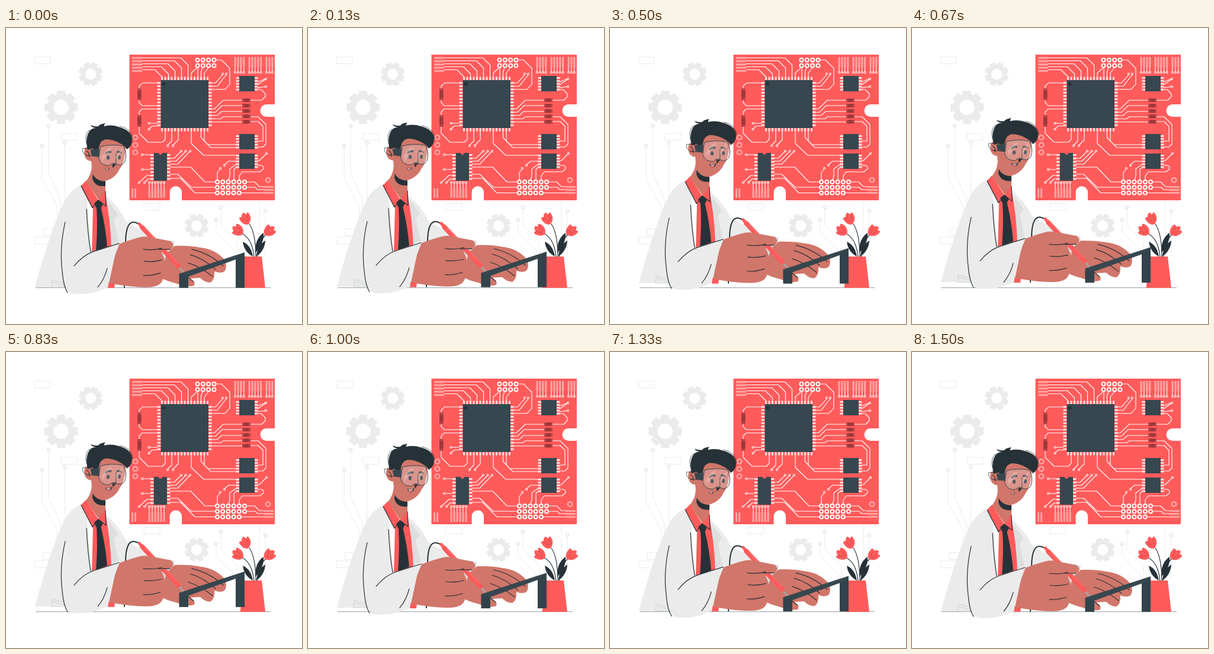
Recreate the animation shown at these times as an HTML page. Size 500 by 500 pixels, loop 1540 ms.

```html
<!DOCTYPE html>
<html lang="en">
<head>
<meta charset="utf-8">
<title>Engineer at work</title>
<style>
html, body { margin: 0; width: 100%; height: 100%; overflow: hidden; background: #fff; }
svg { display: block; width: 100vw; height: 100vh; }
.faint { fill: none; stroke: #ebebeb; }
.ink { fill: none; stroke: #263238; stroke-width: 1.2; stroke-linecap: round; stroke-linejoin: round; }
.thin { stroke-width: .7; }
.trace { fill: none; stroke: #fff; stroke-width: 1.1; stroke-linejoin: round; }
.pin { fill: #ffdede; }
.bar { fill: #ffa3a3; }
.chip { fill: #37474f; }
.dark { fill: #263238; }
.red { fill: #ff5b5b; }
.skin { fill: #d1766a; }
.coat { fill: #ebebeb; }
.shade { fill: #dedede; }
</style>
</head>
<body>
<svg viewBox="0 0 500 500">
  <g id="backdrop"></g>
  <path class="red" d="M208.500 45H454V129H440a10.500 10.500 0 0 0 0 21H454V291H297V277.500a10.200 10.200 0 0 0-20.400 0V291H208.500Z"/>
  <g id="board"></g>
  <path d="M50 438.700H447" stroke="#455a64" stroke-width=".6"/>

  <g id="plant">
    <path class="ink" d="M422 387Q422 347 411 331M419 387Q416 354 396 346M424 387Q426 362 438 350"/>
    <path class="dark" d="M417 386Q402 378 400 361Q414 367 417 386ZM421 380Q420 356 435 346Q437 362 421 380ZM423 386Q424 368 438 359Q437 376 423 386Z"/>
    <g id="flowers"></g>
    <path class="red" d="M402 386H432L438 439H395.500Z"/>
  </g>

  <g id="man">
    <path class="coat" d="M130 263Q108 274 99 292C88 312 67 370 49 438H175L240 365L284 360Q252 356 233 344Q211 332 203 327Q192 303 169 283L160 330L144 377L137 290Z"/>
    <path class="shade" d="M172 292L189 315L182 324L190 361L178 367ZM261 358L285 361L281 379L262 430Z"/>
    <path class="faint" style="stroke:#d2d2d2" d="M78 426L98 431V438H77ZM79 430L97 435"/>
    <path class="red" d="M133 270L147 302L145 379L178 370Q176 320 168 282L157 292Z"/>
    <path class="skin" d="M143 218Q149 242 135 259L157 291L168 279V250Z"/>
    <path class="red" d="M135 258L126.500 267L146 304L156 291ZM167.500 273L169 301L157 291Z"/>
    <path class="ink" d="M127 267L146 304L156 291L169 301L168 276"/>
    <path class="dark" d="M149 296L156 290L164 297L160 305H153ZM153 304H160.500Q168 335 171 369L152 377Q155 337 153 304Z"/>
    <path class="ink" d="M136 306Q138 348 143 378"/>

    <g id="head">
      <path class="skin" d="M144 188L143 203Q132 197 132 211Q133 224 144 225L147 250Q154 261 166 259Q185 254 192 238Q202 226 202 198Q190 181 165 181Z"/>
      <path class="dark" d="M146.500 247Q153 259 168 259V267Q150 269 146 254Z"/>
      <path class="ink" d="M136 208Q141 210 141 218M137 216L141 215"/>
      <path class="dark" d="M138 206Q133 187 141 174Q145 169 152 169Q144 168 143 164Q149 167 156 166Q158 162 168 161Q165 164 166 166Q178 163 190 167Q211 172 213 187Q214 199 204 205Q201 199 193 195Q181 188 169 188Q158 190 157 203L151 207L146 203Z"/>
      <path class="ink thin" d="M136 196Q132 180 141 172M192 166Q213 170 214 188"/>
      <g transform="translate(-.5 1.5)">
        <path d="M143 204L158 203V216L145 214Z" fill="#37474f"/>
        <path class="ink thin" d="M158 203L130 202Q128 212 139 214L158 216"/>
        <path d="M168 210Q173 204 179 207L178 210Q173 208 169 213ZM187 207Q193 204 197 211Q192 208 188 210Z" class="dark"/>
        <g class="dark"><ellipse cx="173" cy="217.500" rx="2.700" ry="3.600"/><ellipse cx="192" cy="217" rx="2.400" ry="3.600"/></g>
        <path class="ink" d="M186.500 211L186 229L181 229"/>
        <path class="dark" d="M180 229L186 229L181 235Z"/>
        <path d="M160 199Q179 194 199 198Q206 212 201 225Q195 233 186 228Q181 225 175 231Q161 232 157 219Z" fill="#fff" fill-opacity=".22" stroke="#37474f"/>
        <path d="M162 215L174 201H180L164 223ZM186 215L196 202H199L187 221Z" fill="#fff" opacity=".2"/>
      </g>
      <g id="mouth">
        <path d="M-7 -2Q0 1 7 -4Q6 6 -1 6Q-5 5 -7 -2Z" class="dark"/>
        <path d="M-5 -1Q0 1 5 -2L4 0Q0 2-4 1Z" fill="#fff"/>
        <path d="M-5 3Q0 0 4 2Q1 8-5 3Z" fill="#ff7f86"/>
      </g>
    </g>

    <path class="skin" d="M285 368Q308 367 329 371Q351 373 367 389Q375 400 370 410Q364 416 352 411Q353 426 345 430Q336 430 328 422L311 423Q321 429 318 435Q308 439 286 431Q270 427 262 422L271 381Z"/>
    <path class="ink" d="M314 374Q344 381 367 402M311 383Q333 389 354 408M308 397Q328 403 349 420M304 418L317 429"/>

    <path class="ink" style="stroke-width:2" d="M202 363C202 339 207 321 224 331M200 430V438"/>
    <path d="M291 402L300 413" stroke="#a6a6a6" stroke-width="3"/>
    <path d="M225 331L231 338" class="ink" style="stroke:#ff5b5b;stroke-width:5"/>
    <path d="M230 337L291 402" class="ink" style="stroke:#ff5b5b;stroke-width:8"/>
    <path d="M235 339L289 396" fill="none" stroke="#ff8585"/>
    <path class="red" d="M173 430L184 432L183 439H172Z"/>
    <path class="skin" d="M188 366Q211 357 228 353Q238 351 251 355L278 360Q287 367 278 374Q270 376 263 373Q262 379 266 386Q271 396 267 408Q269 419 263 429Q257 438 236 438Q211 438 174 431Z"/>
    <path class="ink" d="M232 374Q250 376 263 372M233 394Q249 396 263 392M232 418Q246 419 261 414M258 374L277 374"/>
    <path class="coat" d="M103 325Q91 356 94 405Q97 442 111 449Q135 451 154 445L172 438Q176 400 192 364L145 378L111 400Z"/>
    <path class="ink" d="M100 328Q90 371 95 412Q97 436 104 447M115 402Q130 384 147 378L191 364M171 406Q166 425 155 438"/>
    <path class="chip" d="M292.500 415L403 379V439H388V391L308 420V439H292.500Z"/>
    <path d="M292.500 415L308 420V439H292.500ZM388 391L403 379V439H388Z" fill="#263238" opacity=".18"/>
  </g>
</svg>
<script>
const $ = id => document.getElementById(id);
const range = (n, f) => Array.from({ length: n }, (_, i) => f(i)).join('');
const rect = (cls, x, y, w, h) => `<rect class="${cls}" x="${x}" y="${y}" width="${w}" height="${h}"/>`;
const box = (fill, x, y, w, h) => `<rect fill="${fill}" x="${x}" y="${y}" width="${w}" height="${h}"/>`;
const ring = (x, y, r, color, w) => `<circle cx="${x}" cy="${y}" r="${r}" fill="none" stroke="${color}" stroke-width="${w}"/>`;
const dot = (x, y) => `<circle cx="${x}" cy="${y}" r="1.5" fill="#ff5b5b" stroke="#fff" stroke-width="1.1"/>`;
const dots = (y, ...xs) => xs.map(x => dot(x, y)).join('');
const path = (cls, d) => `<path class="${cls}" d="${d}"/>`;

function gear(x, y, r, turn) {
  const teeth = range(8, i => `<rect x="${-r * .25}" y="${-r}" width="${r * .5}" height="${r * .5}" rx="${r * .06}" transform="rotate(${i * 45 + turn})"/>`);
  return `<g transform="translate(${x} ${y})" fill="#ebebeb">${teeth}${ring(0, 0, r * .64, '#ebebeb', r * .36)}</g>`;
}

function flower(x, y, turn) {
  return `<g transform="translate(${x} ${y}) rotate(${turn})">
    <path class="red" d="M0 11Q-9 9-9-5Q-6-8-4-5Q-1-11 3-10L5-5Q8-9 10-5Q11 7 0 11Z"/>
    <path d="M-4-5Q-4 2 0 6M5-5Q5 2 2 6" fill="none" stroke="#b84446" stroke-width=".7"/></g>`;
}

// A chip with n pins on its left and right sides
const chip = (x, y, w, h, n) => rect('chip', x, y, w, h) + range(n, i => {
  const py = y + 2 + i * (h - 6.5) / (n - 1);
  return rect('pin', x - 5.5, py, 5.5, 3) + rect('pin', x + w, py, 5.5, 3);
});

const resistor = (x, y, w, h, vertical) => box('#b94244', x, y, w, h) +
  (vertical ? box('#9d383b', x, y + 4, w, h - 8) : box('#9d383b', x + 3, y, w - 6, h));

$('backdrop').innerHTML =
  [[48, 49], [93, 178], [233, 296], [48, 353], [63, 339]].map(([x, y]) => rect('faint', x, y, 27, 11.5)).join('') +
  gear(143, 78, 20, 22.5) + gear(93, 134, 28, 0) + gear(322, 334, 20, 22.5) +
  path('faint', 'M72 168V245L92 290V380M61 201V254L87 303V380M99.500 197V345M363 306V333L391 361V384M355 327V345L386 376V438M438 311V386M428 291V350') +
  [[72, 165], [61, 199], [99.500, 194], [363, 303], [355, 324], [438, 309]].map(([x, y]) => ring(x, y, 2.5, '#e5e5e5', 1.4)).join('');

$('flowers').innerHTML = flower(404, 322, -30) + flower(391, 342, -62) + flower(445, 342, 45);

const traces = [
  range(5, i => `M230 ${50.5 + i * 5}H${295.5 - i * 11}l12 12V83`),
  'M322 68L313 76V83M324 67V83M332 67L329.500 74V83M342 67L335 76V83',
  'M347 92.700H354L366 79M347 98.200H357L372 79M354 54H364L378 68V95L370 103.700H347',
  'M225 102V98L231 92.700H256M225 121V126L230 131.200H256M225 147V142L230 136.700H256',
  'M225 167V178L240 193H264L269 188V174M242 161H256M242 170L247 165.500H256',
  'M273 198L280 191V174M282 198L291 189V174M313 174V195L334 215H389',
  'M329.500 174V185L341 197H389M335 174V191L346 202H389',
  'M400 122H367L352 136.700H347M400 131H365L354 142.200H347M400 141H364L357 147.700H347M400 150H367L363 153.200H347M400 158.700H347',
  'M413 122H432L438 116V111L431 104H426M413 150H426L439 163V196L434 201H425M413 158H426L434 166V191H425',
  'M425 91L438 86M425 96L438 87M425 101L438 99M439 213L428 224H425M425 232H431Q436 233 435 238L429 243H399L394 250V257',
  'M369 231L376 225H389M362 238L357 244V257M389 230L378 238V250L376 257M389 235L385 239V257',
  'M231 214H244M231 239H244M226 260L238 249H244M235 260L240 255H244',
  'M277 220H284L295 209M277 225H287L303 209M277 230H290L310 209',
  'M277 235H312L336 260H354M277 247H290L313 269H354M277 254H295L319 278.500H354',
  'M406 260H420L428 268H436M406 269H421L425 273H436M397 278.500H436'
].join('');

const topBars = [[387, 4], [411, 5], [440, 3]];
$('board').innerHTML =
  path('trace', traces) +
  range(5, i => rect('bar', 213, 49 + i * 5.5, 17, 3.2)) +
  topBars.map(([x, n]) => range(n, i => {
    const bx = x + i * 4.9;
    return rect('bar', bx - 1.5, 49, 3.2, 17) + path('trace', `M${bx} 66V74`) + dot(bx, 75);
  })).join('') +
  rect('bar', 212, 271, 3, 16) + rect('bar', 217, 271, 3, 16) +
  range(6, i => rect('bar', 240.5 + i * 5, 271, 3.2, 16) + path('trace', `M${242 + i * 5} 262V271`) + dot(242 + i * 5, 261)) +
  range(3, i => rect('bar', 435, 267 + i * 5, 17, 3) + ring(218.5, 185 + i * 12.5, 3.8, '#ffa3a3', 2.6)) +
  ring(442.5, 257, 3.8, '#ffa3a3', 2.6) +
  range(8, i => ring(323.5 + i % 4 * 9.3, 54 + (i >> 2) * 9.5, 3, '#fff', 2)) +
  range(17, i => ring(357 + i % 6 * 9.2, 260 + Math.floor(i / 6) * 9.2, 3, '#fff', 2)) +
  range(15, i => rect('pin', 262 + i * 5.5, 82.5, 3, 5.5) + rect('pin', 262 + i * 5.5, 169, 3, 5.5)) +
  range(14, i => rect('pin', 255.5, 91.2 + i * 5.5, 6, 3) + rect('pin', 342, 91.2 + i * 5.5, 5.5, 3)) +
  rect('chip', 261.5, 88, 80.5, 81) + '<circle class="dark" cx="266.500" cy="94.500" r="3"/>' +
  chip(394, 81, 26, 26, 5) + chip(394, 179, 26, 26, 5) + chip(394, 212, 26, 26, 5) +
  chip(249.5, 211, 22.5, 47, 8) + '<path class="red" d="M258 211a3 3 0 0 0 6 0Z"/>' +
  resistor(222, 102, 6.5, 20, true) + resistor(222, 147, 6.5, 20, true) +
  range(5, i => resistor(399, 119 + i * 9.1, 14, 6, false)) +
  dots(77.5, 366, 372) + dot(439, 86) + dot(439, 99) + dot(440, 212) +
  dot(241.5, 161) + dot(241.5, 171) + dots(199, 273, 282) + dot(369, 232) + dot(362, 237) +
  dot(230, 214) + dot(230, 239) + dots(261, 225, 234) + dots(208, 296, 303.5, 311);

const PERIOD = 1540, LIFT = 8.7, LEAD = 57;

function draw(now) {
  const rise = (1 - Math.cos((now + LEAD) / PERIOD * 2 * Math.PI)) / 2;
  $('man').setAttribute('transform', `translate(0 ${-LIFT * rise})`);
  const open = Math.min(1, rise * 1.6);
  $('mouth').setAttribute('transform', `translate(${170.5 + 3 * open} 238.500) scale(${.5 + .35 * open} ${.45 + .25 * open})`);
  requestAnimationFrame(() => draw(performance.now()));
}
draw(0);
</script>
</body>
</html>
```
